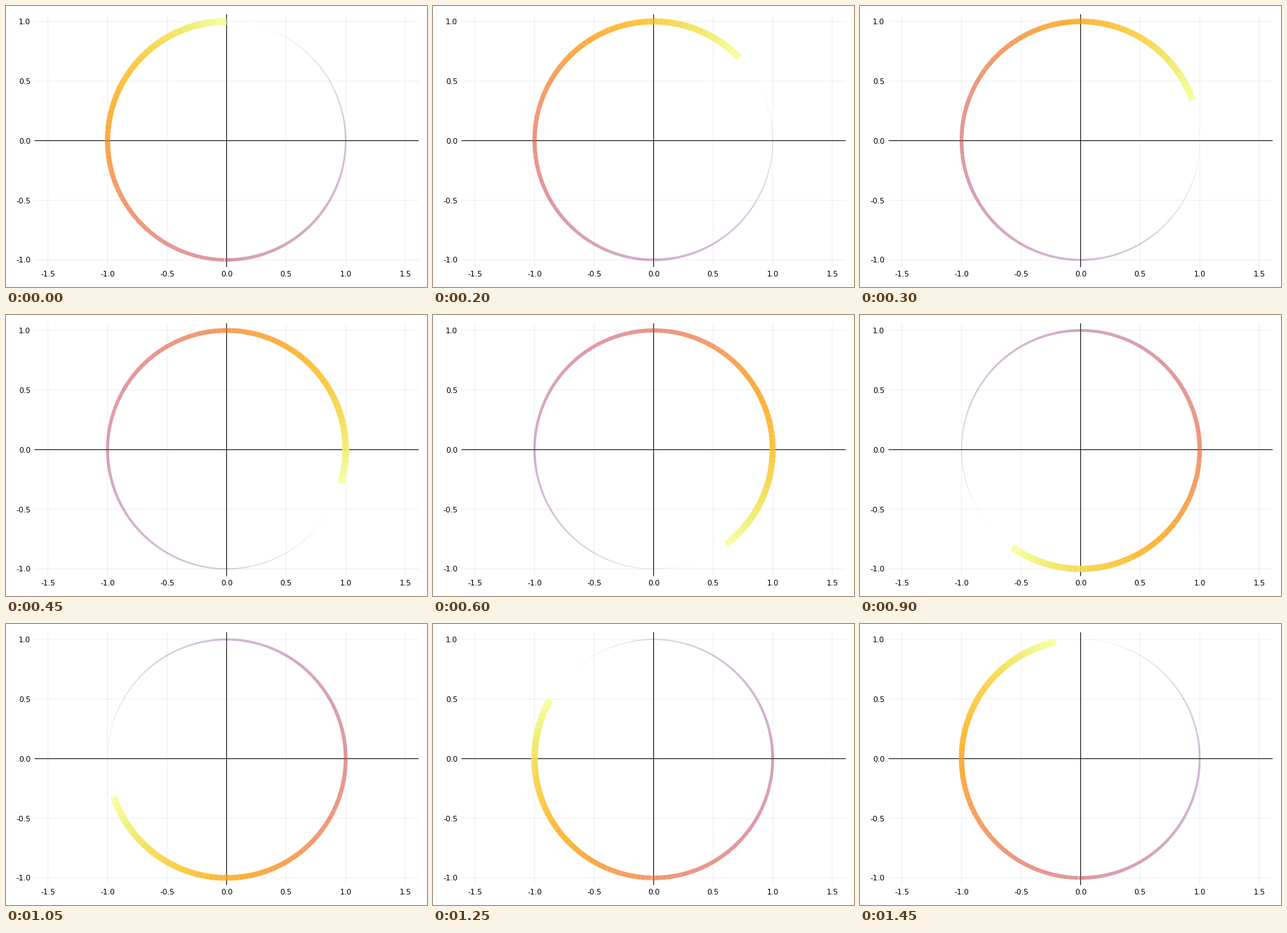
Animation of 600x400 px, one loop 1.5 s. Source, as a matplotlib script:

```python
import matplotlib.pyplot as plt
import numpy as np
from matplotlib.animation import FuncAnimation
from matplotlib.collections import LineCollection

W, H, DPI = 600, 400, 100
LEFT, RIGHT, TOP, BOTTOM = 40.6, 588.2, 11.8, 371.6
CX, CY = (LEFT + RIGHT) / 2, (TOP + BOTTOM) / 2
UNIT = (BOTTOM - TOP) / 2.12

POINTS, STEP = 150, 5
FRAMES, INTERVAL = POINTS // STEP, 50


def pt(px):
    return px * 72 / DPI


def to_x(v):
    return CX + v * UNIT


def to_y(v):
    return CY - v * UNIT


fig = plt.figure(figsize=(W / DPI, H / DPI), dpi=DPI, facecolor="white")
ax = fig.add_axes([0, 0, 1, 1])
ax.set_xlim(0, W)
ax.set_ylim(H, 0)
ax.axis("off")


def rule(xs, ys, **style):
    ax.plot(xs, ys, color="black", snap=False, solid_capstyle="butt", **style)


def label(x, y, value, **align):
    ax.text(x, y, f"{value:.1f}", family="DejaVu Sans", size=pt(10.8),
            color="black", **align)


grid = dict(lw=pt(1), alpha=0.065, zorder=1)
axis = dict(lw=pt(1), zorder=2)

for v in np.arange(-3, 4) / 2:
    rule([to_x(v)] * 2, [TOP, BOTTOM], **grid)
    label(to_x(v), 385, v, ha="center", va="baseline")
for v in np.arange(-2, 3) / 2:
    rule([LEFT, RIGHT], [to_y(v)] * 2, **grid)
    label(35.3, to_y(v) + 4, v, ha="right", va="baseline")
rule([LEFT, RIGHT], [CY, CY], **axis)
rule([CX, CX], [TOP, BOTTOM], **axis)

# The stroke grows in width, opacity and brightness from tail to head.
angle = np.linspace(0, 2 * np.pi, POINTS)
ring = np.column_stack([to_x(np.sin(angle)), to_y(np.cos(angle))])
ramp = np.arange(POINTS - 1) / (POINTS - 1)
colors = plt.get_cmap("inferno")(ramp)
colors[:, 3] = ramp
trail = LineCollection([], colors=colors, linewidths=pt(10 * ramp),
                       capstyle="butt", zorder=3)
ax.add_collection(trail, autolim=False)


def update(frame):
    path = np.roll(ring, -STEP * frame, axis=0)
    trail.set_segments(np.stack([path[:-1], path[1:]], axis=1))
    return [trail]


anim = FuncAnimation(fig, update, frames=FRAMES, interval=INTERVAL,
                     repeat=True, repeat_delay=0)
plt.show()
```
